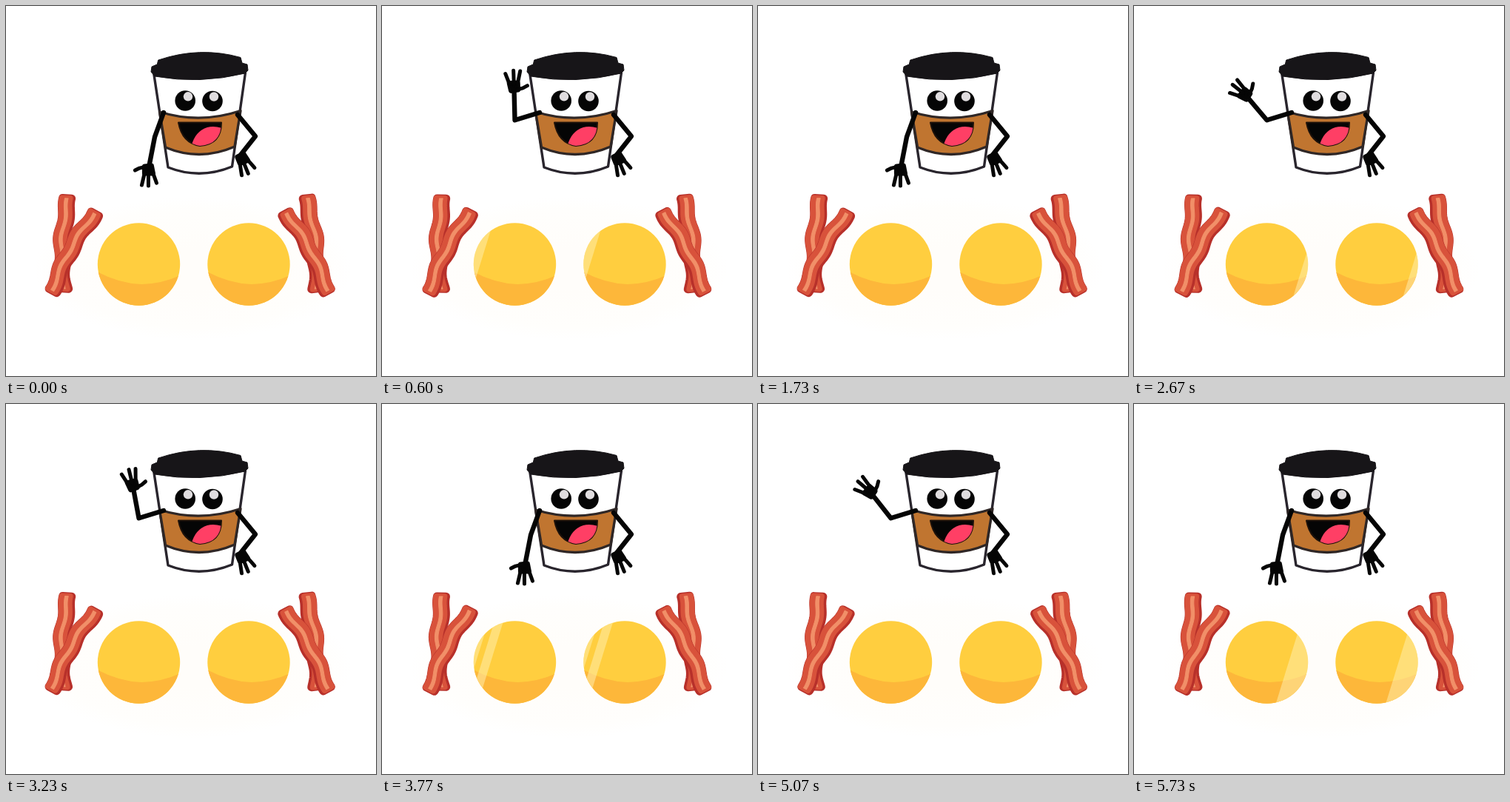
An HTML page with a canvas for the animation above (5.76 s loop, 500x500 px).

```html
<!DOCTYPE html>
<html>
<head>
<meta charset="utf-8">
<title>Breakfast</title>
<style>
html, body { margin: 0; width: 100%; height: 100%; overflow: hidden; background: #fff; }
canvas { display: block; width: 500px; height: 500px; }
</style>
</head>
<body>
<canvas id="stage" width="500" height="500"></canvas>
<script>
const ctx = document.getElementById('stage').getContext('2d');
const LOOP = 5760, WAVE = 1920, SIZZLE = 1562;
const RAD = Math.PI / 180;
const INK = '#050505', LINE = '#29252d';

ctx.lineCap = ctx.lineJoin = 'round';

function shape(d, fill, stroke, width) {
  const p = new Path2D(d);
  if (fill) { ctx.fillStyle = fill; ctx.fill(p); }
  if (stroke) { ctx.strokeStyle = stroke; ctx.lineWidth = width; ctx.stroke(p); }
}

function disc(x, y, r, fill) {
  ctx.fillStyle = fill;
  ctx.beginPath();
  ctx.arc(x, y, r, 0, 7);
  ctx.fill();
}

function polyline(points, width) {
  ctx.strokeStyle = INK;
  ctx.lineWidth = width;
  ctx.beginPath();
  points.forEach(([x, y]) => ctx.lineTo(x, y));
  ctx.stroke();
}

const step = ([x, y], angle, len) =>
  [x + Math.cos(angle * RAD) * len, y + Math.sin(angle * RAD) * len];

function eggWhite() {
  const g = ctx.createRadialGradient(0, 0, 60, 0, 0, 215);
  g.addColorStop(0, '#fffdfa');
  g.addColorStop(0.75, '#fffefc');
  g.addColorStop(1, '#ffffff');
  ctx.save();
  ctx.translate(252, 355);
  ctx.scale(1, 0.45);
  disc(0, 0, 215, g);
  ctx.restore();
}

// Left edge of the wide glint at the yolk's middle height, relative to its centre
function glintAt(t) {
  const s = (t - 646 + SIZZLE + 200) % SIZZLE - 200;
  return -93 + s * 0.307;
}

function yolk(x, t) {
  const r = 55.7, slant = 0.31;
  ctx.save();
  ctx.translate(x, 349);
  disc(0, 0, r, '#ffce3f');
  ctx.beginPath();
  ctx.arc(0, 0, r, 0, 7);
  ctx.clip();
  shape('M-60 8 Q-28 26 4 27 Q34 26 60 13 V60 H-60Z', '#fdb73a');
  const left = glintAt(t);
  for (const [from, to] of [[left, left + 40], [left + 48, left + 60]]) {
    const k = slant * 60;
    shape(`M${from + k} -60 L${to + k} -60 L${to - k} 60 L${from - k} 60Z`, 'rgba(255,241,180,.5)');
  }
  ctx.restore();
}

// Fills the part of a bowed, wavy strip that lies between two offsets from its middle
function band(strip, from, to, fill, edge) {
  const [ax, ay, bx, by, amp, phase] = strip;
  const len = Math.hypot(bx - ax, by - ay);
  const nx = -(by - ay) / len, ny = (bx - ax) / len;
  const put = (s, off) => {
    const o = off + amp * Math.sin(s * 15 + phase) - 5 * Math.sin(s * Math.PI);
    ctx.lineTo(ax + (bx - ax) * s + nx * o, ay + (by - ay) * s + ny * o);
  };
  ctx.beginPath();
  for (let i = 0; i <= 40; i++) put(i / 40, from);
  for (let i = 40; i >= 0; i--) put(i / 40, to);
  ctx.closePath();
  ctx.fillStyle = ctx.strokeStyle = fill;
  ctx.lineWidth = edge;
  ctx.fill();
  ctx.stroke();
}

function rasher(strip) {
  band(strip, -6, 6, '#b7302a', 11);
  band(strip, -7, 4, '#d8523b', 8);
  band(strip, -3, 1.5, '#f18f68', 1);
}

function bacon(backTop, dx, angle, mirror) {
  ctx.save();
  if (mirror) {
    ctx.translate(499, 0);
    ctx.scale(-1, 1);
  }
  ctx.translate(89 + dx, 323);
  ctx.rotate(angle * RAD);
  ctx.translate(-89, -323);
  rasher([79, 382, backTop, 260, 1.8, 2.6]);
  rasher([64, 385, 119, 280, 1.8, 0.4]);
  ctx.restore();
}

function cup() {
  shape('M200 93 L219 218 Q262 235 305.5 217 L323.5 90Z', '#fff', LINE, 3.4);
  shape('M207.5 143 Q262 160 317 141.5 L309 190 Q262 210.5 215.5 191Z', '#c07530', '#2f2726', 3.4);
  shape('M206 73 Q262 54 317 69.5 L319 77 L326 79 L327 87 L323 91 Q262 106 201 95 L196 89 L197 82 L204 79Z',
    '#171518', '#171518', 1);

  disc(242.2, 128, 13.8, INK);
  disc(279, 128.5, 13.8, INK);
  disc(246, 122.3, 6.2, '#e0dddf');
  disc(281, 122.5, 6.2, '#e0dddf');

  const mouth = 'M233 157.5 H291 Q291 187 262 189 Q238 185 233 157.5Z';
  shape(mouth, INK, '#1c110a', 2);
  ctx.save();
  ctx.clip(new Path2D(mouth));
  shape('M250 192 Q254 170 272 164 Q282 161 294 166 V192Z', '#ff3f65');
  ctx.restore();
}

// Fingers point along the angle; the thumb sticks out to the side
function hand(palm, angle, thumb) {
  ctx.save();
  ctx.translate(...palm);
  ctx.rotate(angle * RAD);
  shape('M-5 -4 L5 -6 L5 5 L-4 5Z', INK, INK, 7);
  for (const [base, tip, reach] of [[5, 9, 21], [0, 0, 22], [-6, -11, 18]]) {
    polyline([[4, base], [reach, tip]], 5);
  }
  if (thumb) polyline([[-4, 4], [-2, 12], [1, 18]], 5);
  ctx.restore();
}

function restingArm() {
  polyline([[313, 147], [337, 176], [318, 200]], 6.4);
  hand([319, 206], 68, false);
}

// Time, then angles of upper arm, forearm and hand
const DOWN = [110, 101, 90], IN = [163, 298, 306], OUT = [163, 229, 217];
const POSES = [[0, DOWN], [230, DOWN], [490, IN], [735, OUT], [970, IN],
  [1200, OUT], [1440, IN], [1695, DOWN], [WAVE, DOWN]];

function armPose(t) {
  const i = POSES.findIndex(([at]) => at > t);
  const [t0, a] = POSES[i - 1], [t1, b] = POSES[i];
  const e = (1 - Math.cos(Math.PI * (t - t0) / (t1 - t0))) / 2;
  return a.map((v, k) => v + (b[k] - v) * e);
}

function wavingArm(t) {
  const [upper, fore, turn] = armPose(t % WAVE);
  const shoulder = [213, 144];
  const elbow = step(shoulder, upper, 35);
  const palm = step(elbow, fore, 45);
  polyline([shoulder, elbow, palm], 6.4);
  hand(palm, turn, true);
}

function draw(t) {
  ctx.fillStyle = '#fff';
  ctx.fillRect(0, 0, 500, 500);
  eggWhite();
  const sway = Math.cos((t - 100) / SIZZLE * 2 * Math.PI);
  bacon(83, 0, 1.3 * sway, false);
  bacon(92, sway, 0.6 * sway, true);
  yolk(179.5, t);
  yolk(328, t);
  cup();
  restingArm();
  wavingArm(t);
}

const start = performance.now();
function tick() {
  draw((performance.now() - start) % LOOP);
  requestAnimationFrame(tick);
}
tick();
</script>
</body>
</html>
```
